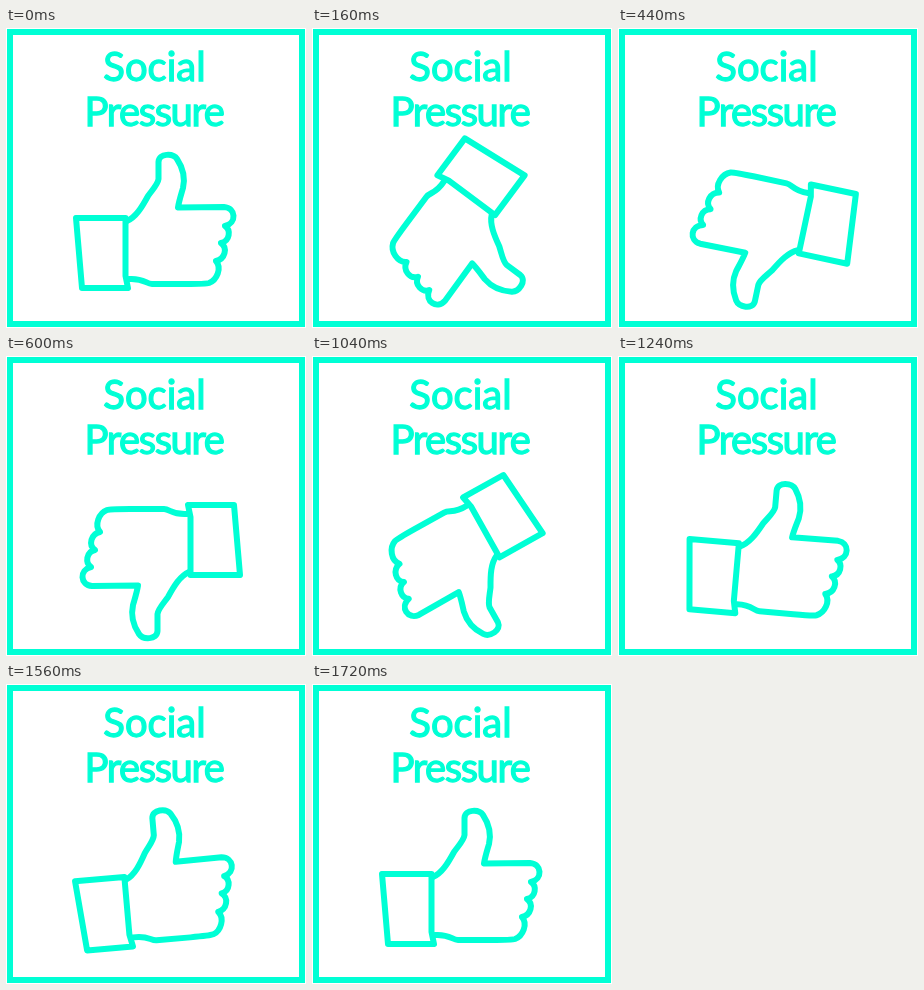
An HTML page that plays this animation: 300x300 px, repeating every 1.92 s.

```html
<!DOCTYPE html>
<html lang="en">
<head>
<meta charset="utf-8">
<title>Social Pressure</title>
<style>
  html, body { margin: 0; width: 100%; height: 100%; overflow: hidden; background: #fff; }
  svg { display: block; width: 100%; height: 100%; }
  text { font: 40px Lato, sans-serif; fill: #00ffd5; stroke: #00ffd5; stroke-width: 1.3; text-anchor: middle; }
  .line { fill: none; stroke: #00ffd5; stroke-width: 6; stroke-linejoin: round; stroke-linecap: round; }
</style>
</head>
<body>
<svg viewBox="0 0 300 300">
  <rect class="line" x="4" y="4" width="292" height="292" style="stroke-linejoin: miter"/>
  <text x="148.5" y="53">Social</text>
  <text x="148" y="98" letter-spacing="-1.4">Pressure</text>
  <g id="hand" class="line">
    <path d="M70 190H119.5V248L122 260H76Z"/>
    <path d="M121 193C130 189 136 179 142 168C147 161 152 156 152.5 151V134
      C153 125 167 125 171 131C177 140 179 151 177 160C175 167 173 173 172 179.5L218 179
      C230 180 231 195 219 198C225 202 224 213 215 215C222 220 219 231 210 233
      C216 240 211 252 203 255C200 256 190 256 180 256H146C140 256 138 250 123 251"/>
  </g>
</svg>
<script>
  const LOOP = 1920, STEP = 40;
  const CENTER = "152 204.5";
  // [time in ms, angle in degrees], linear in between
  const swing = [
    [0, 0], [240, 190], [320, 201], [600, 180], [1000, 180],
    [1240, 5], [1280, -10], [1400, 22], [1560, -5], [1720, 0], [LOOP, 0]
  ];
  const hand = document.getElementById("hand");

  function angleAt(time) {
    const next = swing.findIndex(([end]) => end > time);
    const [t0, a0] = swing[next - 1], [t1, a1] = swing[next];
    return a0 + (a1 - a0) * (time - t0) / (t1 - t0);
  }

  const start = performance.now();
  function draw() {
    const elapsed = (performance.now() - start) % LOOP;
    const time = Math.floor(elapsed / STEP) * STEP;
    hand.setAttribute("transform", `rotate(${angleAt(time)} ${CENTER})`);
    requestAnimationFrame(draw);
  }
  draw();
</script>
</body>
</html>
```
